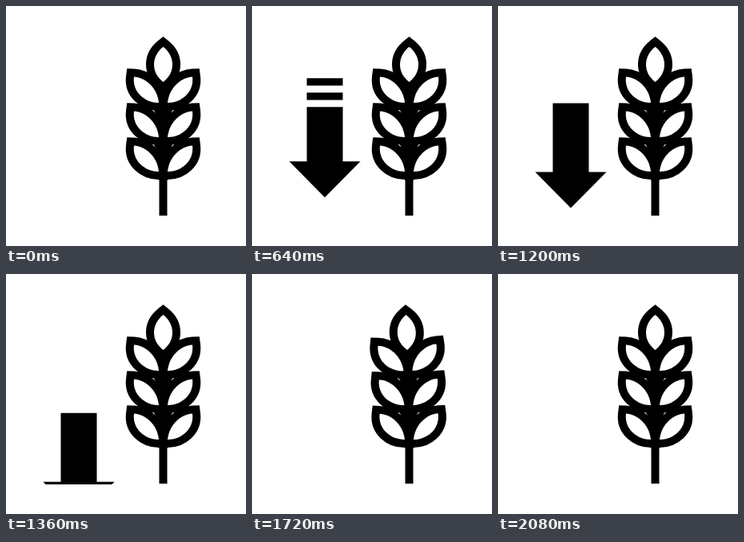
An HTML page for the animation above (2920 ms loop, 300 px wide and 300 px high).

```html
<!DOCTYPE html>
<html lang="en">
<head>
<meta charset="utf-8">
<title>Wheat and falling arrow</title>
<style>
  html, body { margin: 0; width: 100%; height: 100%; overflow: hidden; background: #fff; }
  svg { display: block; width: 100vw; height: 100vh; }
</style>
</head>
<body>
<svg viewBox="0 0 300 300">
  <defs>
    <clipPath id="slot"><rect x="40" y="85" width="100" height="178"/></clipPath>
    <path id="leaf" d="M160 88.5C173 89 189 101 191 121C174 121 157.5 108 160 88.5Z"/>
    <g id="row">
      <path d="M180 77H213L201.5 100V132H191.5V100Z" fill="#000" stroke="none"/>
      <use href="#leaf"/>
      <use href="#leaf" transform="matrix(-1 0 0 1 393 0)"/>
    </g>
    <!-- each joint bends on top of the one below it -->
    <g id="ear">
      <g class="joint" data-y="215">
        <use href="#row" y="86"/>
        <g class="joint" data-y="172">
          <use href="#row" y="43"/>
          <g class="joint" data-y="129">
            <use href="#row"/>
            <g class="joint" data-y="95">
              <path d="M196.5 51C204 57 208 65 208 73C208 82 204 89 196.5 95C189 89 185 82 185 73C185 65 189 57 196.5 51Z"/>
            </g>
          </g>
        </g>
      </g>
    </g>
  </defs>
  <g clip-path="url(#slot)"><path id="arrow"/></g>
  <path d="M191.5 205H201.5V262H191.5Z"/>
  <use href="#ear" stroke="#000" stroke-width="20"/>
  <use href="#ear" fill="#fff"/>
</svg>
<script>
const LOOP = 2920, STEP = 40;
const arrow = document.getElementById('arrow');
const joints = document.querySelectorAll('#ear .joint');
const clamp = x => Math.min(1, Math.max(0, x));
const span = (t, from, to) => clamp((t - from) / (to - from));
const smooth = x => x * x * (3 - 2 * x);

// Sway keys: time in ms, bend of every joint in degrees
const sway = [[1450, 0], [1600, 2.4], [1800, -2.2], [1960, 1], [2080, 0]];

function bend(t) {
  let angle = 0;
  for (let i = 1; i < sway.length; i++) {
    const [from, a] = sway[i - 1], [to, b] = sway[i];
    if (t >= from) angle = a + (b - a) * smooth(span(t, from, to));
  }
  return angle;
}

const bar = (y, h) => `M68.5 ${y}h45v${h}h-45Z`;

function arrowPath(t) {
  const drop = 1 - (1 - span(t, 0, 1100)) ** 3;
  const tip = 78 + 174 * drop + 145 * span(t, 1160, 1440) ** 3;
  const gap = 9 * (1 - smooth(span(t, 680, 1120)));
  const top = tip - 113;
  return `M91 ${tip}L46.5 ${tip - 45}H68.5V${top}H113.5V${tip - 45}H135.5Z`
    + bar(top - gap - 9, 9.1) + bar(top - 2 * gap - 18, 9.1);
}

function draw(now) {
  const t = Math.floor(now % LOOP / STEP) * STEP;
  const angle = bend(t);
  arrow.setAttribute('d', arrowPath(t));
  for (const joint of joints)
    joint.setAttribute('transform', `rotate(${angle} 196.5 ${joint.dataset.y})`);
  requestAnimationFrame(draw);
}
draw(performance.now());
</script>
</body>
</html>
```
